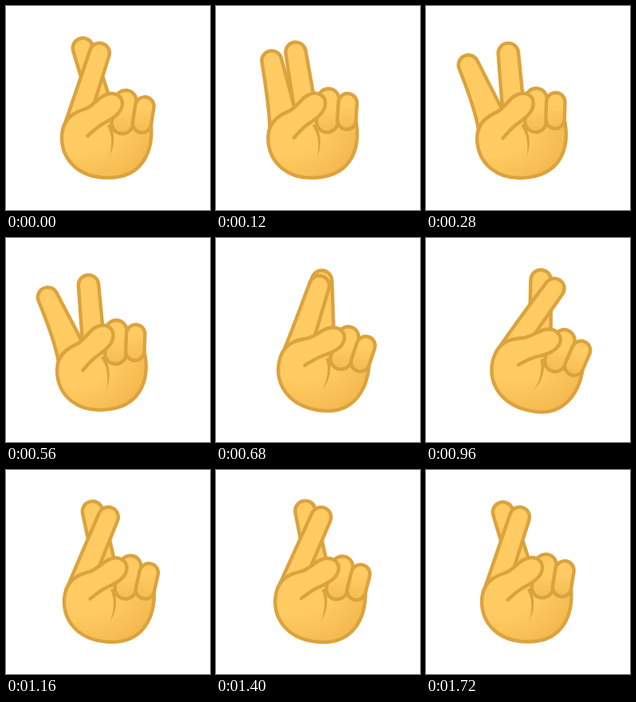
These frames come from a looping animation (256x256 px, 1920 ms). An HTML page:

```html
<!DOCTYPE html>
<html lang="en">
<head>
<meta charset="utf-8">
<title>Crossed fingers</title>
<style>
  html, body { margin: 0; width: 100%; height: 100%; overflow: hidden; background: #fff; }
  svg { display: block; width: 100%; height: 100%; }
  #hand { fill: #ffcb62; stroke: #dba33d; stroke-width: 4.4; stroke-linecap: round; stroke-linejoin: round; }
  #palm { fill: url(#palmShade); }
  #ring, #pinky { fill: url(#knuckleShade); }
  #crease { fill: #dba33d; stroke: none; }
</style>
</head>
<body>
<svg viewBox="0 0 256 256">
  <defs>
    <radialGradient id="palmShade" gradientUnits="userSpaceOnUse" cx="95" cy="130" r="105">
      <stop offset=".5" stop-color="#ffcb62"/>
      <stop offset="1" stop-color="#f2b74c"/>
    </radialGradient>
    <linearGradient id="knuckleShade" gradientUnits="userSpaceOnUse" x1="160" y1="130" x2="162" y2="162">
      <stop offset="0" stop-color="#ffcb62"/>
      <stop offset="1" stop-color="#f4ba50"/>
    </linearGradient>
  </defs>
  <g id="hand">
    <path id="back"/>
    <path id="front"/>
    <path id="palm" d="M72 152C77 138 88 133 100 129C110 125 116 115 125 111.5L146 123L182 148C185 180 173 215.5 128 215.5C88 215.5 70 190 70 165Q70 158 72 152Z"/>
    <path id="crease" d="M127 150C133 160 134 174 129.5 189C137 176 137 160 131 148Z"/>
    <path id="ring"/>
    <path id="pinky"/>
    <path d="M72 152C77 138 88 133 100 129C110 125 116 115 125 111.5C136 106.5 146.5 113 146 123C145.6 134 134 141 124 146.5C115 151 108 158 102.5 163"/>
  </g>
</svg>
<script>
const LOOP = 1920, STEP = 40, LAST = 1720;
const $ = id => document.getElementById(id);

// time, hand angle, finger spread (0 crossed, 1 open), sideways bend of the tips
const KEYS = [
  [0, 0, 0, 0],
  [200, -8.5, 1.1, 0],
  [290, -7, 0.99, 0],
  [560, -7.1, 1.01, 0],
  [750, 17, 0, 2],
  [840, 15, 0, 6],
  [1000, 14.3, 0, 4],
  [1160, 3.5, 0, 1.5],
  [1210, 2.9, 0, 0],
  [1300, 4.6, 0, 1],
  [1420, 5, 0, 1],
  [1690, 0, 0, 0],
  [1720, 0, 0, 0]
];

const slope = (a, b, c) => (b[c] - a[c]) / (b[0] - a[0]);

// Tangents are flat at every turning point
function tangent(i, c) {
  if (i === 0 || i === KEYS.length - 1) return 0;
  const before = slope(KEYS[i - 1], KEYS[i], c);
  const after = slope(KEYS[i], KEYS[i + 1], c);
  return before * after <= 0 ? 0 : 2 * before * after / (before + after);
}

function valueAt(t, c) {
  const i = Math.min(KEYS.findLastIndex(k => k[0] <= t), KEYS.length - 2);
  const a = KEYS[i], b = KEYS[i + 1], span = b[0] - a[0];
  const u = (t - a[0]) / span, v = 1 - u;
  return a[c] * v * v * (1 + 2 * u) + b[c] * u * u * (3 - 2 * u)
    + span * u * v * (v * tangent(i, c) - u * tangent(i + 1, c));
}

const mix = (a, b, u) => a + (b - a) * u;

// Returns a function giving points at a distance to the right of the finger's axis
function acrossAxis(tipX, tipY, baseX, baseY) {
  const length = Math.hypot(tipX - baseX, tipY - baseY);
  const nx = (baseY - tipY) / length, ny = (tipX - baseX) / length;
  return (x, y, r) => `${(x + nx * r).toFixed(2)} ${(y + ny * r).toFixed(2)}`;
}

// Tapered finger from base to rounded tip
function finger(tipX, tipY, tipR, baseX, baseY, baseR, closed) {
  const at = acrossAxis(tipX, tipY, baseX, baseY);
  return `M${at(baseX, baseY, -baseR)}L${at(tipX, tipY, -tipR)}`
    + `A${tipR} ${tipR} 0 0 1 ${at(tipX, tipY, tipR)}L${at(baseX, baseY, baseR)}`
    + (closed ? `A${baseR} ${baseR} 0 0 1 ${at(baseX, baseY, -baseR)}Z` : "");
}

// The front finger's outer edge flows from a fixed point on the palm
function frontFinger(spread, bend) {
  const x = mix(117.5, 70.6, spread) + bend, y = mix(58.8, 66.3, spread), r = 12.5;
  const at = acrossAxis(x, y, mix(88, 102, spread), 150);
  return `M73.5 149Q${mix(82, 73, spread)} 124 ${at(x, y, -r)}`
    + `A${r} ${r} 0 0 1 ${at(x, y, r)}L${mix(104, 112, spread)} 143`;
}

function draw(t) {
  const [angle, spread, bend] = [1, 2, 3].map(c => valueAt(t, c));
  $("hand").setAttribute("transform", `rotate(${angle.toFixed(3)} 125 214)`);
  $("front").setAttribute("d", frontFinger(spread, bend));
  $("back").setAttribute("d", finger(
    mix(96.5, 122.6, spread) + bend * 1.4, mix(53, 57.6, spread), 12.7, 120 + bend * 0.3, 128, 13.5));
}

function tick() {
  const t = performance.now() % LOOP;
  draw(Math.min(Math.floor(t / STEP) * STEP, LAST));
  requestAnimationFrame(tick);
}

$("ring").setAttribute("d", finger(150.3, 119, 13.3, 146, 147, 13.3, true));
$("pinky").setAttribute("d", finger(174, 125.5, 11.7, 170.5, 147.5, 11.7, true));
tick();
</script>
</body>
</html>
```
